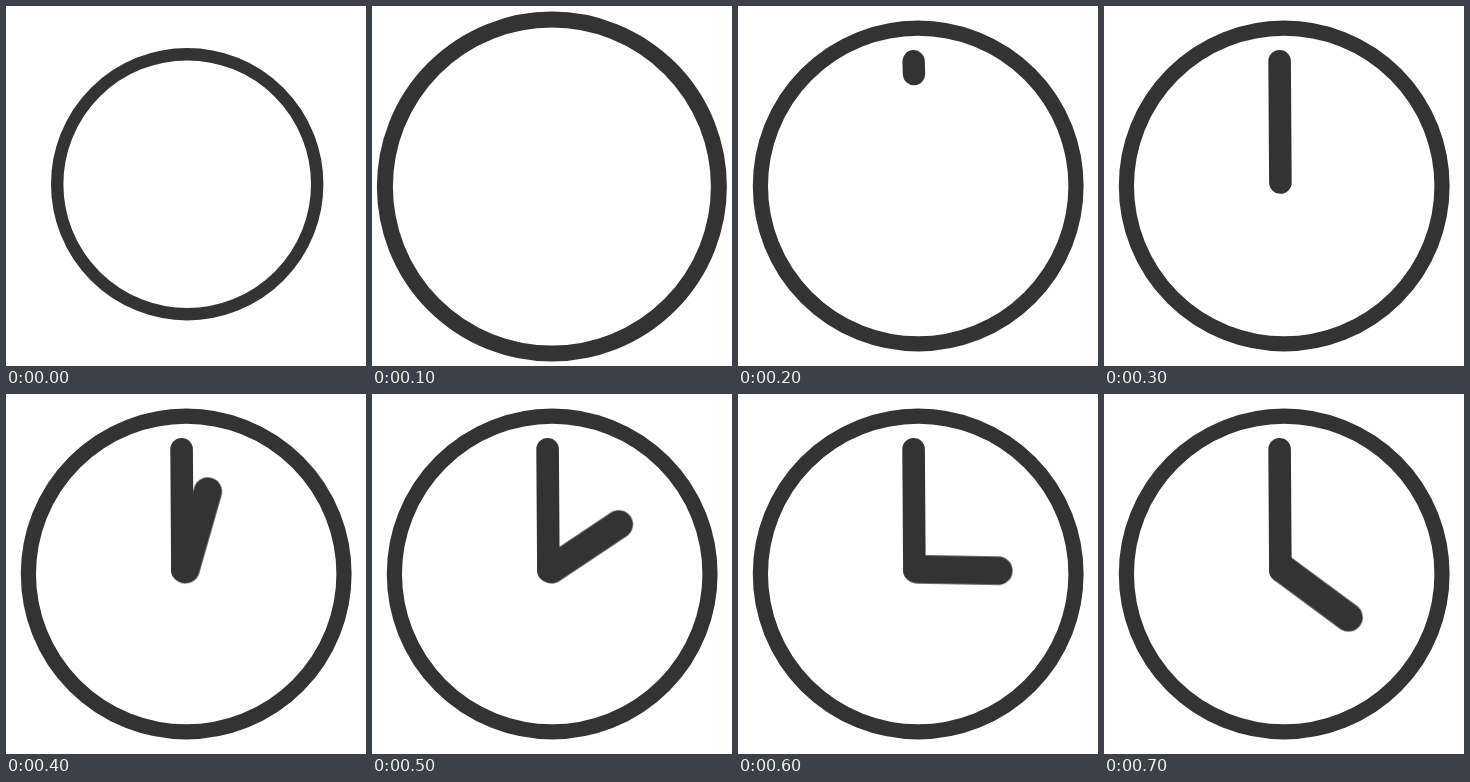
These frames come from a looping animation (360 px wide and 360 px high, 0.8 s). An HTML page:

```html
<!DOCTYPE html>
<html lang="en">
<head>
<meta charset="utf-8">
<title>Clock</title>
<style>
  html, body { margin: 0; width: 100%; height: 100%; overflow: hidden; background: #fff; }
  svg { display: block; width: 100vw; height: 100vh; }
  .ring, .hand { fill: none; stroke: #333; stroke-linecap: round; }
  .ring, .hand { animation: 800ms step-end infinite; }
  .ring { animation-name: pop; }
  .stub { animation-name: stub; }
  .minute { animation-name: minute; }
  .hour { animation-name: hour; transform-origin: 179.5px 175.3px; }

  /* The ring overshoots, then settles */
  @keyframes pop {
    0% { cx: 181.2px; cy: 178.2px; r: 130px; stroke-width: 12.4px; }
    12.5% { cx: 179.9px; cy: 180.6px; r: 167px; stroke-width: 16px; }
    25%, 100% { cx: 180.2px; cy: 180px; r: 157.8px; stroke-width: 15.2px; }
  }
  @keyframes stub {
    0% { opacity: 0; }
    25% { opacity: 1; }
    37.5%, 100% { opacity: 0; }
  }
  @keyframes minute {
    0% { opacity: 0; }
    37.5%, 100% { opacity: 1; }
  }
  /* The hour hand sweeps from one to four */
  @keyframes hour {
    0% { opacity: 0; transform: rotate(16deg); }
    50% { opacity: 1; transform: rotate(16deg); }
    62.5% { opacity: 1; transform: rotate(56.3deg); }
    75% { opacity: 1; transform: rotate(91deg); }
    87.5%, 100% { opacity: 1; transform: rotate(126.5deg); }
  }
</style>
</head>
<body>
<svg viewBox="0 0 360 360">
  <circle class="ring" cx="180" cy="180" r="158"/>
  <line class="hand stub" x1="175.6" y1="55.3" x2="176" y2="68" stroke-width="22.4"/>
  <line class="hand minute" x1="175.6" y1="55.3" x2="176.4" y2="176.5" stroke-width="22.6"/>
  <line class="hand hour" x1="179.5" y1="175.3" x2="179.5" y2="94.5" stroke-width="28.4"/>
</svg>
</body>
</html>
```
